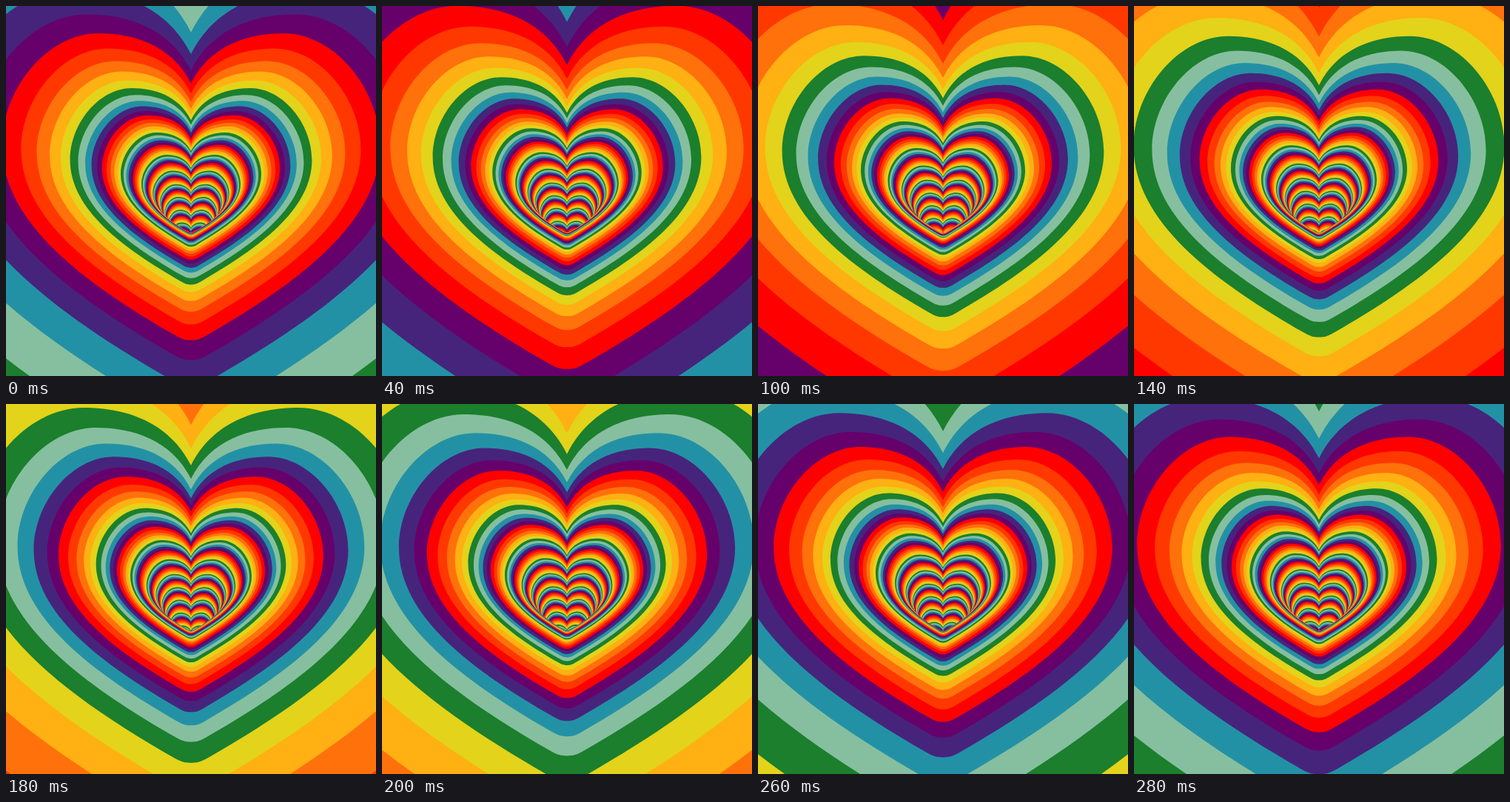
Write an HTML page with a canvas that moves like this. It is 500x500 px and loops after 300 ms.

```html
<!DOCTYPE html>
<html lang="en">
<head>
<meta charset="utf-8">
<title>Heart tunnel</title>
<style>
  html, body { margin: 0; width: 100%; height: 100%; overflow: hidden; background: #f00; }
  canvas { display: block; width: 100vw; height: 100vh; }
</style>
</head>
<body>
<canvas id="stage" width="500" height="500"></canvas>
<script>
  const ctx = document.getElementById('stage').getContext('2d');
  const COLORS = ['#ff0000', '#ff3800', '#ff710a', '#ffb012', '#e3d31a',
                  '#1b7f2d', '#86bf9f', '#2391a5', '#46247c', '#66006a'];
  const STEP = 20, STEPS = 15, STEPS_PER_CYCLE = 14.5;
  const NEAR = 0.2, FAR = 12;

  // Right half of a heart of half-width 1, from the tip at the origin
  // up to the notch, y pointing up: Bezier points after the first.
  const half = [
    [0, 0],
    [0.03, 0], [0.045, 0.004], [0.08, 0.024],
    [0.56, 0.30], [1, 0.62], [1, 1.03],
    [1, 1.33], [0.76, 1.624], [0.49, 1.624],
    [0.30, 1.624], [0.10, 1.56], [0, 1.36]
  ];
  const mirrored = half.map(([x, y]) => [-x, y]).reverse();
  const heart = new Path2D();
  heart.moveTo(0, 0);
  for (const side of [half, mirrored]) {
    for (let i = 1; i < side.length; i += 3) {
      heart.bezierCurveTo(...side[i], ...side[i + 1], ...side[i + 2]);
    }
  }
  heart.closePath();

  // Perspective size, with a tunnel that bends downwards with depth.
  const halfWidth = z => 226.9 / (z - 0.009);
  const tipY = z => 227 + 196.9 / z + 5.28 * z + 0.592 * z * z;

  function draw(phase) {
    ctx.save();
    for (let i = 0; ; i++) {
      const z = i / 10 - 0.1025 - phase;
      if (z < NEAR) continue;
      if (z > FAR) break;
      const w = halfWidth(z);
      ctx.setTransform(w, 0, 0, -w, 250, tipY(z));
      ctx.fillStyle = COLORS[i % COLORS.length];
      ctx.fill(heart);
      ctx.clip(heart); // nearer rings hide the deeper ones
    }
    ctx.restore();
  }

  let shown = -1;
  function tick() {
    const step = Math.floor(performance.now() / STEP) % STEPS;
    if (step !== shown) {
      shown = step;
      draw(step / STEPS_PER_CYCLE);
    }
    requestAnimationFrame(tick);
  }
  tick();
</script>
</body>
</html>
```
